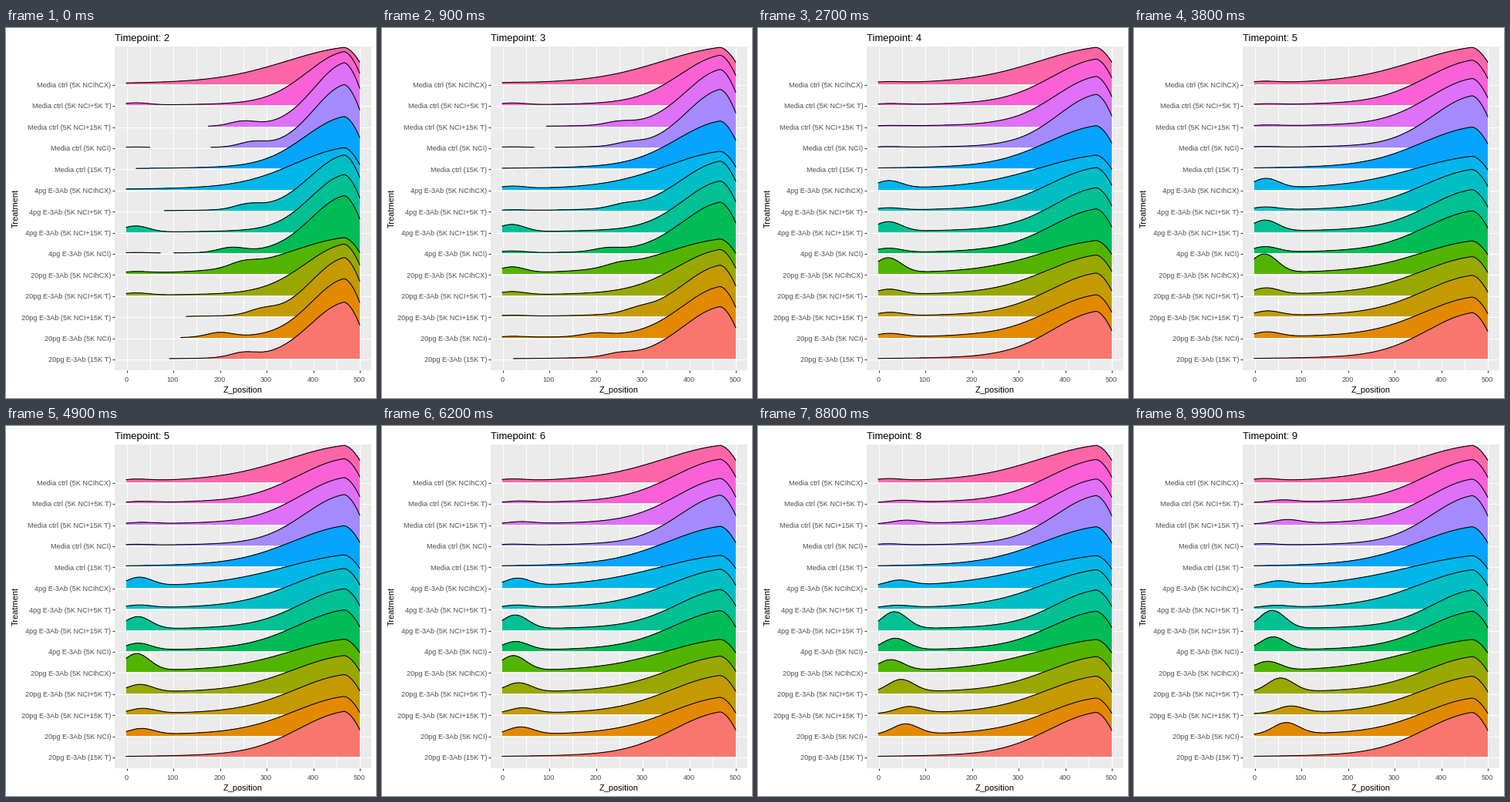
Animation of 480 by 480 pixels, one loop 10 s. Source, as a matplotlib script:

```python
import numpy as np
import matplotlib.pyplot as plt
from matplotlib.animation import FuncAnimation
from matplotlib.patches import Rectangle

plt.rcParams["font.family"] = "Liberation Sans"

SIZE, DPI, FRAMES = 480, 100, 100
PT = 72 / DPI
Z = np.linspace(0, 500, 501)
MODE, AREA, TAIL, CUTOFF = 466, 9900, 16, 0.7
LEFT, RIGHT, TOP, BOTTOM = 141, 474, 24, 444

fig = plt.figure(figsize=(SIZE / DPI, SIZE / DPI), dpi=DPI, facecolor="white")
ax = fig.add_axes([0, 0, 1, 1])
ax.set_xlim(0, SIZE)
ax.set_ylim(SIZE, 0)
ax.axis("off")


def px(z):
    return 156.1 + 0.6056 * z


def line(xs, ys, color):
    ax.plot(xs, ys, color=color, lw=PT, zorder=1, solid_capstyle="butt")


def text(x, y, s, size, color="black", **kw):
    return ax.text(x, y, s, fontsize=size * PT, color=color,
                   va="baseline", zorder=50, **kw)


def hue(k, n, light=65, chroma=100):
    """Evenly spaced hues in polar CIE-LUV, converted to sRGB."""
    a = np.radians(15 + 360 * k / n)
    u = chroma * np.cos(a) / (13 * light) + 0.19784
    v = chroma * np.sin(a) / (13 * light) + 0.46834
    y = ((light + 16) / 116) ** 3
    xyz = [9 * y * u / (4 * v), y, y * (12 - 3 * u - 20 * v) / (4 * v)]
    rgb = np.array([[3.2406, -1.5372, -0.4986],
                    [-0.9689, 1.8758, 0.0415],
                    [0.0557, -0.2040, 1.0570]]) @ xyz
    rgb = np.clip(rgb, 0, 1)
    return np.where(rgb > 0.0031308, 1.055 * rgb ** (1 / 2.4) - 0.055,
                    12.92 * rgb)


def bell(center, width):
    return np.exp(-((Z - center) / width) ** 2 / 2)


class Ridge:
    """Density whose peak sinks from start to end while its area stays fixed.

    hump: strength of the low-Z bump at times 2, 4.5 and 9; it drifts to `drift`.
    shoulder: place of a small early bump that fades out.
    """

    def __init__(self, start, end, hump=(0, 0, 0), drift=20, shoulder=None):
        self.start, self.end = start, end
        self.hump, self.drift, self.shoulder = hump, drift, shoulder

    def place(self, k, n, name):
        self.base = 429.64 - 27.42 * k
        y = int(self.base)
        line([LEFT, RIGHT], [y + 0.5] * 2, "white")
        line([LEFT - 3, LEFT], [y + 0.5] * 2, "#333333")
        text(136.3, self.base + 3.8, name, 9.1, "#4D4D4D", ha="right")
        z = 40 - 2 * k
        self.fill, = ax.fill([0, 0, 0], [0, 0, 0], color=hue(k, n), lw=0,
                             antialiased=False, zorder=z)
        self.edge, = ax.plot([], [], color="black", lw=1.07 * PT, zorder=z + 1)

    def heights(self, t):
        peak = self.end + (self.start - self.end) * np.exp((2 - t) / 1.4)
        center = 20 + (self.drift - 20) * ((t - 2) / 7) ** 2
        extra = np.interp(t, [2, 4.5, 9], self.hump) * bell(center, 28)
        if self.shoulder:
            extra = extra + 6 * max(0, 1 - (t - 2) / 2) * bell(self.shoulder, 28)

        # Sharper peaks have shorter tails; the core takes the remaining area.
        reach = 85 + 3.8 * (83 - peak)
        tail = TAIL * np.exp((Z - MODE) / reach)
        core = peak - TAIL
        rest = AREA - extra.sum() - tail[:MODE].sum() - 30 * peak
        body = core * bell(MODE, rest / (1.2533 * core)) + tail
        edge = np.clip((Z - MODE) / (500 - MODE), 0, 1)
        return np.where(Z < MODE, body, peak * (1 - 0.4 * edge ** 1.75)) + extra

    def draw(self, t):
        h = self.heights(t)
        shown = h > CUTOFF
        x, floor = px(Z), int(self.base)
        y = np.where(shown, self.base - h, floor)
        self.fill.set_xy(np.column_stack([[x[0], *x, x[-1]],
                                          [floor, *y, floor]]))
        self.edge.set_data(x, np.where(shown, y, np.nan))


# Panel, vertical grid and axes
ax.add_patch(Rectangle((LEFT, TOP), RIGHT - LEFT, BOTTOM - TOP,
                       fc="#EBEBEB", lw=0, zorder=0))
for z in range(0, 501, 50):
    x = int(px(z)) + 0.5
    line([x, x], [TOP, BOTTOM], "white")
    if z % 100 == 0:
        line([x, x], [BOTTOM, BOTTOM + 3], "#333333")
        text(px(z) - 0.3, 458.6, str(z), 9.1, "#4D4D4D", ha="center")
text(307.5, 473, "Z_position", 11, ha="center")
text(15.5, 234, "Treatment", 11, ha="center", rotation=90,
     rotation_mode="anchor")
title = text(LEFT, 17, "", 13, ha="left")

MIXES = ["15K T", "5K NCI", "5K NCI+15K T", "5K NCI+5K T", "5K NCIhCX"]
GROUPS = {
    "20pg E-3Ab": [
        Ridge(74, 58, shoulder=250),
        Ridge(77, 49, (0, 6, 15), 68, shoulder=200),
        Ridge(77, 50, (0, 6, 9), 78, shoulder=290),
        Ridge(67, 48, (3, 8, 18), 56),
        Ridge(48, 43, (2, 25, 12), 28, shoulder=250),
    ],
    "4pg E-3Ab": [
        Ridge(75, 52, (1, 7, 17), 40, shoulder=225),
        Ridge(75, 52, (8, 14, 24), 38),
        Ridge(73, 51, (0, 4, 3), 45, shoulder=260),
        Ridge(55, 42, (0, 13, 6), 50),
    ],
    "Media ctrl": [
        Ridge(68, 52),
        Ridge(82, 65, (1, 1, 2), shoulder=270),
        Ridge(83, 59, (0, 1, 5), 70, shoulder=250),
        Ridge(70, 57, (3, 1, 3), 60),
        Ridge(48, 48, (0, 2, 3)),
    ],
}

ridges = [r for group in GROUPS.values() for r in group]
names = [f"{dose} ({mix})" for dose, group in GROUPS.items()
         for mix in MIXES[-len(group):]]
for k, (ridge, name) in enumerate(zip(ridges, names)):
    ridge.place(k, len(ridges), name)


def draw(i):
    t = 2 + 7 * i / (FRAMES - 1)
    title.set_text(f"Timepoint: {int(t + 0.5)}")
    for ridge in ridges:
        ridge.draw(t)
    return [title]


anim = FuncAnimation(fig, draw, frames=FRAMES, interval=100,
                     repeat=True, repeat_delay=0, blit=False)
plt.show()
```
